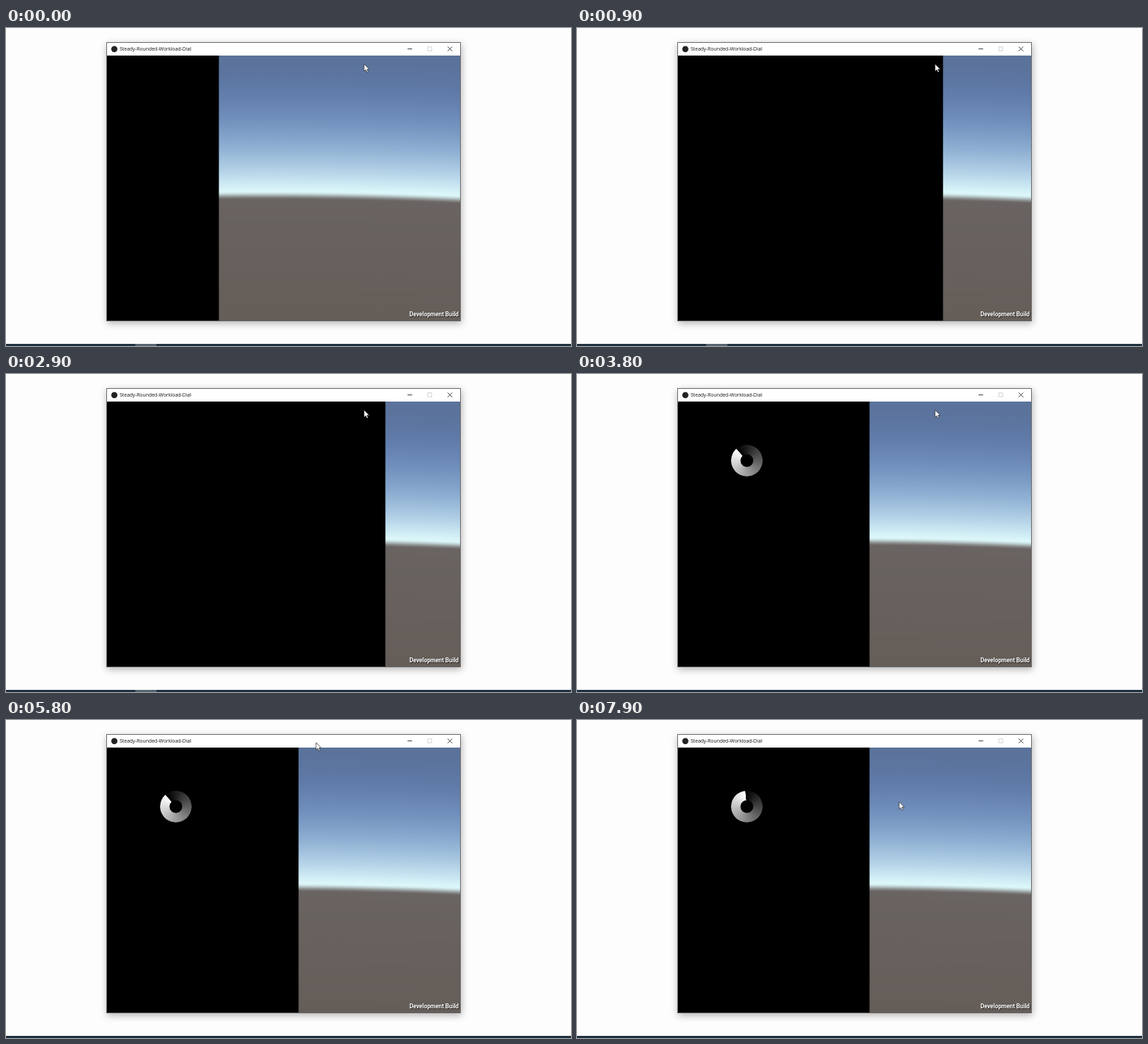
Recreate the animation shown at these times as an HTML page with a canvas. Size 800x450 px, loop 8000 ms.

```html
<!DOCTYPE html>
<html lang="en">
<head>
<meta charset="utf-8">
<title>Loading dial</title>
<style>
  html, body { margin: 0; width: 100%; height: 100%; overflow: hidden; background: #fefdfe; }
  #stage { position: absolute; left: 0; top: 0; width: 800px; height: 450px; overflow: hidden; }
  #stage > * { position: absolute; }
  #window { left: 143px; top: 21px; width: 500px; height: 393px; background: #fff;
    box-shadow: 0 0 0 1px #686868, 1px 3px 10px 1px rgba(0, 0, 0, .3); }
  #sky, #panel { left: 143px; top: 39px; }
  #panel { height: 375px; width: 500px; background: #000; transform-origin: left; }
  #taskbar { left: 0; top: 447px; width: 800px; height: 3px; background: #1f303d; }
  #task { left: 183px; top: 447px; width: 30px; height: 3px; background: #56646f; }
  #ring { left: 217.7px; top: 99.7px; width: 45.6px; height: 45.6px; border-radius: 50%;
    -webkit-mask: radial-gradient(circle, transparent 8.7px, #000 9.3px);
    mask: radial-gradient(circle, transparent 8.7px, #000 9.3px); }
  #art { left: 0; top: 0; }
</style>
</head>
<body>
<div id="stage">
  <div id="window"></div>
  <canvas id="sky" width="500" height="375"></canvas>
  <div id="panel"></div>
  <div id="ring"></div>
  <div id="taskbar"></div>
  <div id="task"></div>
  <svg id="art" width="800" height="450" viewBox="0 0 800 450">
    <circle cx="153.4" cy="29.8" r="4.4" fill="#222"/>
    <text x="161" y="32.4" font-family="'Open Sans', sans-serif" font-size="6.95" fill="#111">Steady-Rounded-Workload-Dial</text>
    <g fill="none" stroke="#222" stroke-width=".9">
      <path d="M568.5 29.6h6.6"/>
      <path d="M597.2 26.7h5.6v5.6h-5.6z" stroke="#ccc"/>
      <path d="M625.4 26.4l6.4 6.4M631.8 26.4l-6.4 6.4"/>
    </g>
    <g font-family="Roboto, sans-serif" font-weight="700" font-size="8.25" text-anchor="end">
      <text x="641.8" y="408.9" fill="#000" fill-opacity=".75">Development Build</text>
      <text x="641" y="408.1" fill="#fff">Development Build</text>
    </g>
    <path id="cursor" d="M0 0V10.3L2.4 8.1L4 11.6L5.7 10.8L4.1 7.4H7.3Z" fill="#fff" stroke="#222" stroke-width=".7"/>
  </svg>
</div>
<script>
  const LOOP = 8000, STEP = 100;
  const FREEZE = 3430; // the panel stalls here and the ring takes over
  const $ = id => document.getElementById(id);
  const clamp = v => Math.min(1, Math.max(0, v));
  const mix = (a, b, p) => a + (b - a) * p;
  const smooth = p => p * p * (3 - 2 * p);

  // Cursor stops: time, x, y
  const stops = [[4500, 507, 51], [5600, 439, 34], [6300, 439, 24], [8600, 461, 142]];

  function cursorAt(t) {
    let [, x, y] = stops[0];
    for (let i = 1; i < stops.length; i++) {
      const [start] = stops[i - 1], [end, nextX, nextY] = stops[i];
      const p = smooth(clamp((t - start) / (end - start)));
      x = mix(x, nextX, p);
      y = mix(y, nextY, p);
    }
    return [x, y];
  }

  // Each channel brightens towards the horizon at its own rate, then fades into the ground
  function skyColor(y) {
    const rise = clamp((y - 40) / 190), fade = smooth(clamp((y - 231) / 12));
    const depth = clamp((y - 243) / 170);
    const channel = (top, horizon, power, near, far) =>
      mix(mix(top, horizon, rise ** power), mix(near, far, depth), fade);
    return `rgb(${channel(91, 220, 2.3, 105, 101)}, ${channel(115, 247, 2, 99, 93)}, ${channel(154, 250, 1.35, 97, 88)})`;
  }

  // One-pixel columns follow a bent horizon
  function paintSky() {
    const g = $('sky').getContext('2d');
    const top = 20, height = 400;
    const fill = g.createLinearGradient(0, top, 0, top + height);
    for (let y = 0; y <= height; y += 2) fill.addColorStop(y / height, skyColor(top + y));
    g.fillStyle = fill;
    for (let x = 0; x < 500; x++) {
      const bend = 6 * ((x - 227) / 273) ** 2;
      g.setTransform(1, 0, 0, 1, 0, bend - 39);
      g.fillRect(x, top, 1, height);
    }
  }

  function draw() {
    const t = Math.floor(performance.now() % LOOP / STEP) * STEP;
    const loading = t > FREEZE;
    const width = 249.8 + 250 * Math.cos((Math.min(t, FREEZE) - 1945) / 1000);
    $('panel').style.transform = `scaleX(${width / 500})`;
    $('task').style.visibility = loading ? 'hidden' : 'visible';
    $('ring').style.visibility = loading ? 'visible' : 'hidden';
    $('ring').style.background =
      `conic-gradient(from ${31 + t * .36}deg, #000, #fff 99.5%, #000)`;
    $('cursor').setAttribute('transform', `translate(${cursorAt(t)})`);
    requestAnimationFrame(draw);
  }

  paintSky();
  draw();
</script>
</body>
</html>
```
